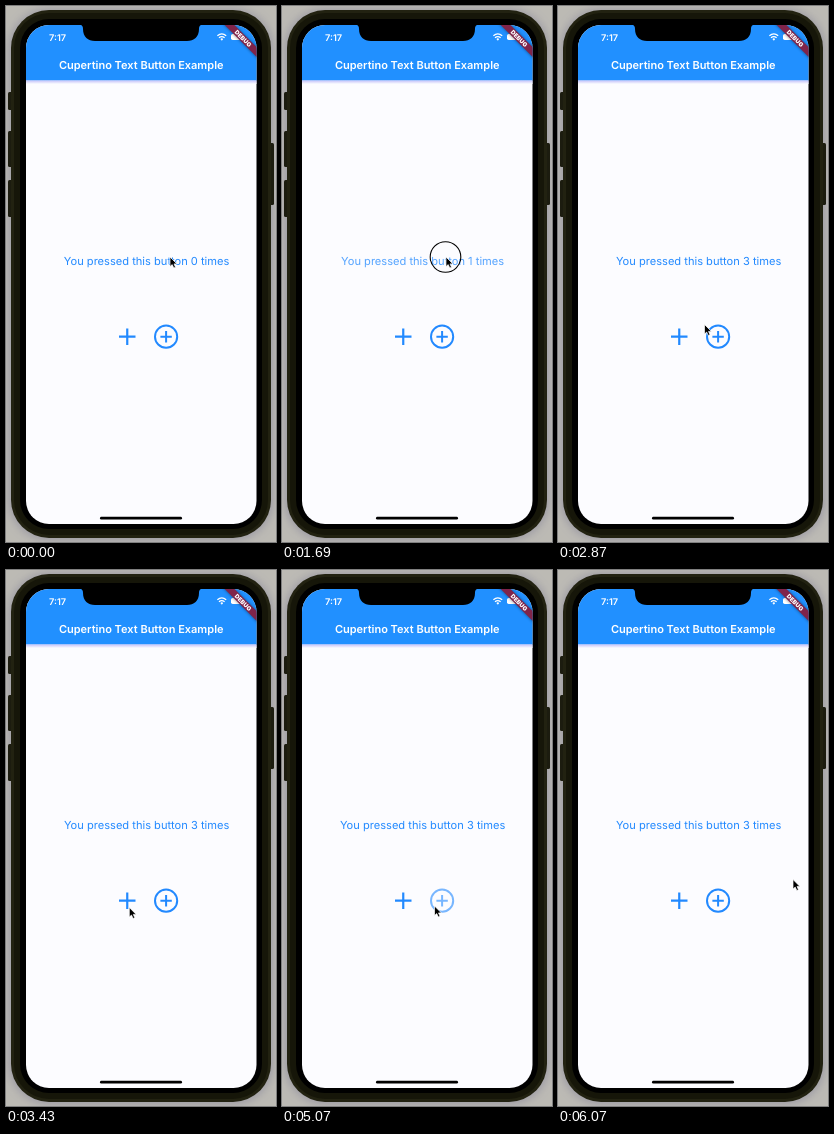
These frames come from a looping animation (270x536 px, 6730 ms). An HTML page:

```html
<!DOCTYPE html>
<html lang="en">
<head>
<meta charset="utf-8">
<title>Text button demo</title>
<style>
  html, body { margin: 0; width: 100%; height: 100%; overflow: hidden; background: #bcbab4; }
  svg { display: block; width: 100vw; height: 100vh; }
  text { font-family: Inter, Roboto, sans-serif; text-rendering: geometricPrecision; }
  .icon { fill: none; stroke: #2289ff; stroke-width: 2.2; }
</style>
</head>
<body>
<svg viewBox="0 0 270 536">
  <defs>
    <clipPath id="screen"><rect x="20" y="19" width="230.500" height="499" rx="23"/></clipPath>
    <filter id="soft" x="-20%" y="-20%" width="140%" height="140%"><feGaussianBlur stdDeviation="4"/></filter>
    <filter id="shade" x="-20%" y="-60%" width="140%" height="220%"><feGaussianBlur stdDeviation="1.500"/></filter>
    <linearGradient id="fade" x2="0" y2="1">
      <stop stop-color="#c4c2fa"/><stop offset="1" stop-color="#fcfcff"/>
    </linearGradient>
  </defs>

  <!-- phone -->
  <rect width="270" height="536" fill="#bcbab4"/>
  <rect x="3" y="3" width="264" height="531" rx="40" fill="#8d8b9c" opacity=".7" filter="url(#soft)"/>
  <g fill="#1c1c0f">
    <rect x="2" y="86" width="5" height="18" rx="1.5"/>
    <rect x="2" y="125" width="5" height="36" rx="1.5"/>
    <rect x="2" y="174" width="5" height="37" rx="1.5"/>
    <rect x="263" y="137" width="5" height="62" rx="1.5"/>
  </g>
  <rect x="5" y="4" width="260" height="528" rx="38" fill="#222211"/>
  <rect x="8" y="7" width="254" height="522" rx="35" fill="#161609"/>
  <rect x="14" y="13" width="242" height="510" rx="29" fill="#000"/>

  <!-- screen -->
  <g clip-path="url(#screen)">
    <rect x="20" y="19" width="231" height="499" fill="#fcfcff"/>
    <rect x="20" y="19" width="231" height="55.500" fill="#2190ff"/>
    <rect x="20" y="74.500" width="231" height="3.500" fill="url(#fade)"/>
    <path d="M73 18.500C76 19 77 20 77 23C77 31 82 35 89 35H181C188 35 193 31 193 23C193 20 194 19 197 18.500Z"/>
    <text x="43" y="35" font-size="9.200" font-weight="600" fill="#fff">7:17</text>
    <g fill="none" stroke="#fff" stroke-width="1.300">
      <path d="M211.400 29.800Q215.800 26 220.200 29.800M213 31.800Q215.800 29.400 218.600 31.800"/>
      <circle cx="215.800" cy="33.300" r=".5"/>
    </g>
    <rect x="225" y="28" width="12" height="6" rx="1.700" fill="#fff"/>
    <rect x="237.600" y="30" width="1" height="2" fill="#fff"/>
    <g transform="translate(250.500 19) rotate(45)">
      <rect x="-26" y="15.600" width="52" height="6.900" opacity=".5" filter="url(#shade)"/>
      <rect x="-26" y="15.600" width="52" height="6.900" fill="#80244a"/>
      <text y="21.200" font-size="6" font-weight="900" text-anchor="middle" fill="#fff">DEBUG</text>
    </g>
    <text x="135.200" y="63.300" font-size="11" font-weight="600" text-anchor="middle" fill="#fff">Cupertino Text Button Example</text>
  </g>
  <rect x="94" y="510.800" width="82" height="2.700" rx="1.350"/>

  <!-- buttons -->
  <text id="label" x="140.600" y="258.600" font-size="11.100" text-anchor="middle" fill="#2289ff"></text>
  <path id="plus" class="icon" d="M113 330.700H129.500M121.250 322.500V339"/>
  <g id="ring" class="icon">
    <circle cx="160.100" cy="330.700" r="11.100" stroke-width="2"/>
    <path d="M154.400 330.700H165.800M160.100 325V336.400" stroke-width="2"/>
  </g>

  <!-- pointer -->
  <circle id="touch" cx="-.5" r="15.300" fill="none" stroke="#000" stroke-width="1.100"/>
  <path id="arrow" d="M0 0V9.600L2.200 7.600L3.800 11L5.500 10.200L4 6.900H6.900Z" stroke="#fff" stroke-width=".7"/>
</svg>
<script>
const LOOP = 6730;
const $ = id => document.getElementById(id);
const label = $('label'), touch = $('touch'), arrow = $('arrow');

// [press, release] per button
const taps = {
  label: [[1110, 1260], [1640, 1790], [2180, 2330]],
  plus: [[3920, 4060]],
  ring: [[4870, 5010]]
};
// [time, x, y]
const route = [
  [0, 164, 251], [2640, 164, 251], [2870, 146.500, 318.500], [3300, 123.300, 337.500],
  [4250, 123.300, 337.500], [4640, 152.500, 336], [5500, 152.500, 336], [6060, 235, 309.500], [LOOP, 235, 309.500]
];

const clamp = v => Math.min(1, Math.max(0, v));
const ease = v => v * v * (3 - 2 * v);

function opacity(t, list) {
  return list.reduce((o, [down, up]) => {
    const dim = ease(clamp((t - down) / 120)) * (1 - clamp((t - up) / 180));
    return Math.min(o, 1 - 0.6 * dim);
  }, 1);
}

function pointer(t) {
  const i = route.findIndex(p => p[0] > t);
  const [t0, x0, y0] = route[i - 1], [t1, x1, y1] = route[i];
  const k = ease((t - t0) / (t1 - t0));
  return [x0 + (x1 - x0) * k, y0 + (y1 - y0) * k];
}

function draw(now) {
  const t = now % LOOP;
  const count = taps.label.filter(([, up]) => t >= up).length;
  const text = `You pressed this button ${count} times`;
  if (label.textContent !== text) label.textContent = text;
  for (const id in taps) $(id).setAttribute('opacity', opacity(t, taps[id]));

  const [x, y] = pointer(t);
  const place = `translate(${x} ${y})`;
  arrow.setAttribute('transform', place);
  touch.setAttribute('transform', place);
  const held = Object.values(taps).flat().some(([down, up]) => t >= down && t < up);
  touch.setAttribute('visibility', held ? 'visible' : 'hidden');
}

const start = performance.now();
function tick() {
  draw(Math.max(0, performance.now() - start));
  requestAnimationFrame(tick);
}
draw(0);
requestAnimationFrame(tick);
</script>
</body>
</html>
```
